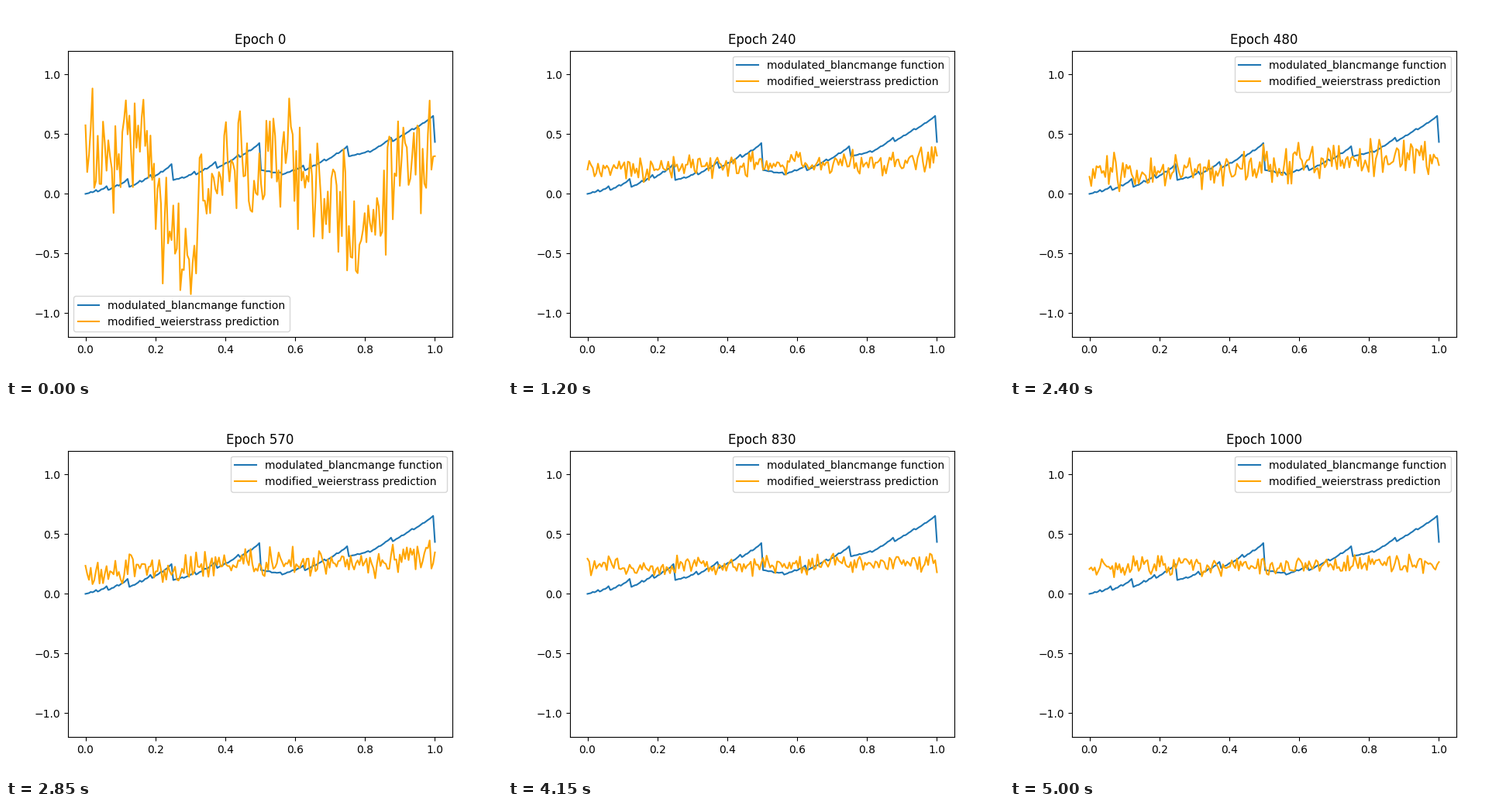
A matplotlib script that plays this animation: 640x480 px, repeating every 5050 ms.

```python
import numpy as np
import matplotlib.pyplot as plt
from matplotlib.animation import FuncAnimation

FRAMES, INTERVAL, STEP = 101, 50, 10
x = np.linspace(0, 1, 200)


def through(*points):
    """Straight segments through a few (x, y) key points."""
    return np.interp(x, *zip(*points))


def blancmange():
    """Trend plus halving ramps that rise late and drop at each dyadic point."""
    trend = through((0, 0), (.25, .115), (.3, .115), (.5, .2), (.56, .16),
                    (.62, .188), (.75, .312), (.81, .323), (.995, .52),
                    (1, .435))
    ramps = sum(np.maximum(0, 2 * (2 ** n * x % 1) - 1) / 2 ** n
                for n in range(1, 9))
    return trend + .39 * np.exp(-x) * ramps


def prediction(k):
    noise = np.random.default_rng(500 + k).normal(size=x.size).clip(-2.2, 2.2)
    if k == 0:
        wave = through((0, .4), (.16, .38), (.22, -.2), (.31, -.3), (.36, .15),
                       (.44, .35), (.5, -.05), (.57, .4), (.66, .05),
                       (.8, -.35), (.9, .3), (1, .25))
        return wave + .25 * noise
    # Noise and tilt swell mid-training, then settle
    swell = np.exp(-((k - 45) / 20) ** 2)
    tilt = .03 + .13 * swell
    spread = .04 + .04 * swell + .15 * np.exp(-k / 1.5)
    return .24 + tilt * (x - .5) + spread * noise


fig, ax = plt.subplots(figsize=(6.4, 4.8), dpi=100)
ax.plot(x, blancmange(), label="modulated_blancmange function")
line, = ax.plot(x, prediction(0), color="orange",
                label="modified_weierstrass prediction")
ax.set_ylim(-1.2, 1.2)


def update(k):
    line.set_ydata(prediction(k))
    ax.set_title(f"Epoch {k * STEP}")
    ax.legend(loc="upper right" if k else "lower left")
    return line,


anim = FuncAnimation(fig, update, frames=FRAMES, interval=INTERVAL,
                     repeat=True, repeat_delay=0, blit=False)
plt.show()
```
